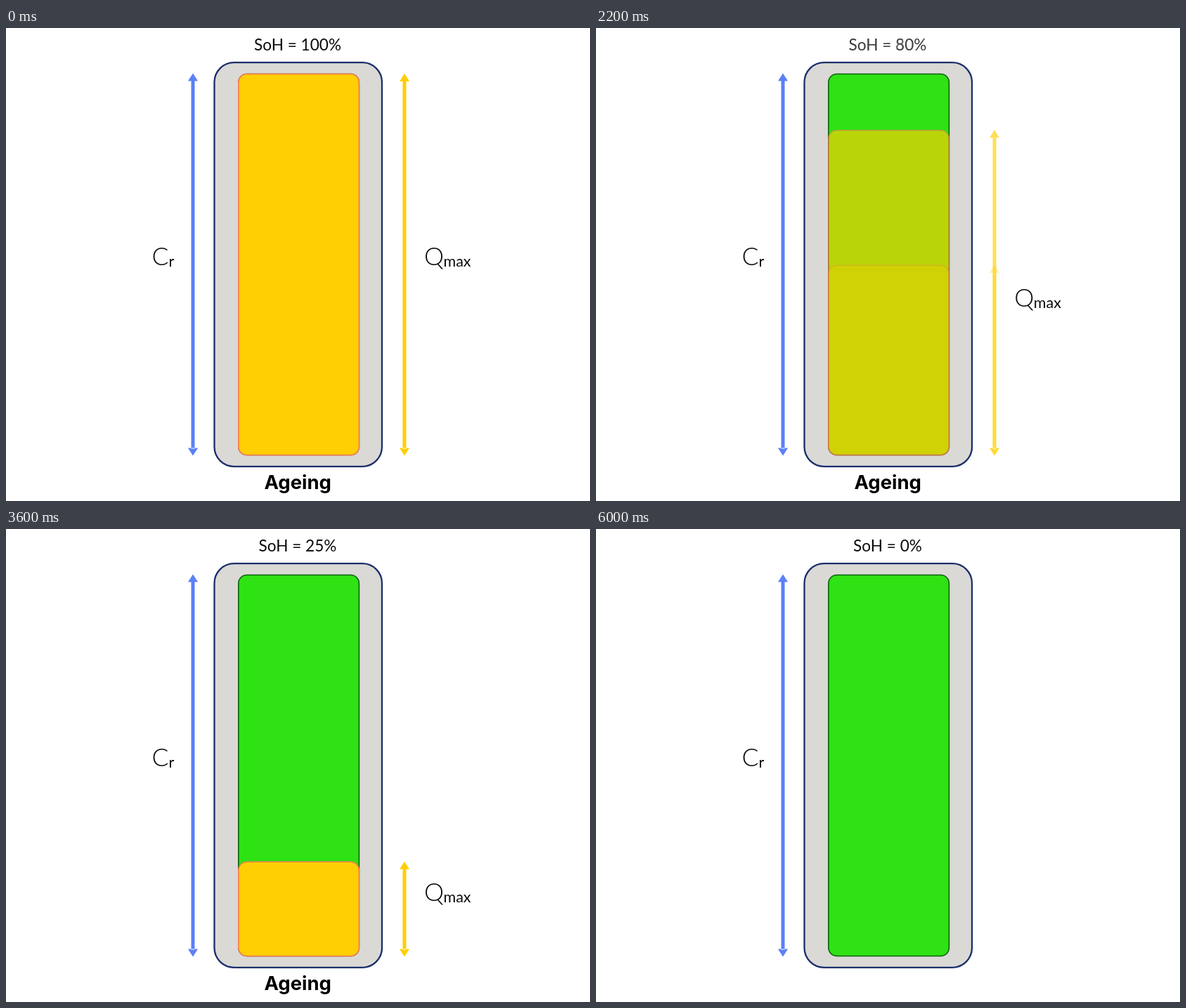
Write an HTML page that moves like this. It is 831 by 674 pixels and loops after 7 s.

```html
<!DOCTYPE html>
<html lang="en">
<head>
<meta charset="utf-8">
<title>Battery ageing</title>
<style>
  html, body { margin: 0; width: 100%; height: 100%; overflow: hidden; background: #fff; }
  svg { display: block; width: 831px; height: 674px; }
  text { font-family: Lato, sans-serif; fill: #0b0b0b; }
  .soh { font-size: 22.6px; text-anchor: middle; }
  .big { font-size: 35.5px; font-weight: 300; }
  .sub { font-size: 21.5px; }
  .name { font: 700 27.5px Inter, sans-serif; text-anchor: middle; fill: #000; }
</style>
</head>
<body>
<svg id="stage" viewBox="0 0 831 674">
  <rect x="296.5" y="49.2" width="238.5" height="575.6" rx="28" fill="#dad9d5" stroke="#1b2f6b" stroke-width="2.3"/>
  <rect x="330.8" y="65.5" width="171.6" height="543" rx="12" fill="#2fe213" stroke="#0d5f14" stroke-width="1.6"/>
  <g id="levels"></g>
  <g id="rated"></g>
  <text class="big" x="207.5" y="338">C</text>
  <text class="sub" x="231.5" y="339.5">r</text>
  <g id="qmax">
    <text class="big" x="595" y="338">Q</text>
    <text class="sub" x="622.5" y="339.5">max</text>
  </g>
  <text id="name" class="name" x="415.2" y="657">Ageing</text>
</svg>
<script>
const LOOP = 7000, PERIOD = 1200, HOLD = 1000, STEP = 100;
const BOTTOM = 608.5;

// state of health, top of the fill, label offset [x, y]
const states = [
  { soh: 100, top: 65.5, label: [0, 0] },
  { soh: 80, top: 145.7, label: [0, 26.5] },
  { soh: 50, top: 338.3, label: [1, 124] },
  { soh: 25, top: 474.2, label: [0, 192] },
  { soh: 15, top: 531.5, label: [1, 218] },
  { soh: 0, label: [1, 218] }
];

const $ = id => document.getElementById(id);

function arrow(x, top, bottom, color) {
  const head = (y, d) => `M${x} ${y}l7 ${d}h-14z`;
  return `<path fill="${color}" d="${head(top, 11)}${head(bottom, -11)}M${x - 2.5} ${top + 10}h5V${bottom - 10}h-5z"/>`;
}

function level({ soh, top }) {
  const fill = top === undefined ? "" :
    `<rect x="330.8" y="${top}" width="171.6" height="${BOTTOM - top}" rx="12" fill="#ffcf03" stroke="#ff7852" stroke-width="1.6"/>` +
    arrow(567, top - 0.5, 609.5, "#ffcf03");
  return `<g>${fill}<text class="soh" x="415" y="32">SoH = ${soh}%</text></g>`;
}

$("levels").innerHTML = states.map(level).join("");
$("rated").innerHTML = arrow(266, 64.5, 609.5, "#5b80f7");
const groups = [...$("levels").children];
const last = states.length - 1;

function draw(time) {
  const t = time % LOOP;
  const i = Math.min(Math.floor(t / PERIOD), last);
  const next = Math.min(i + 1, last);
  const late = t - i * PERIOD - HOLD;
  const mix = i === last || late < 0 ? 0 : (Math.floor(late / STEP) + 1) / 3;

  groups.forEach((g, n) => {
    g.style.opacity = n === i ? 1 - mix : n === next ? mix : 0;
  });
  const [x, y] = states[i].label.map((v, k) => v + (states[next].label[k] - v) * mix);
  $("qmax").setAttribute("transform", `translate(${x} ${y})`);
  const shown = i === last ? 0 : next === last ? 1 - mix : 1;
  $("qmax").style.opacity = $("name").style.opacity = shown;
}

const start = performance.now();
function tick() {
  draw(performance.now() - start);
  requestAnimationFrame(tick);
}
tick();
</script>
</body>
</html>
```
